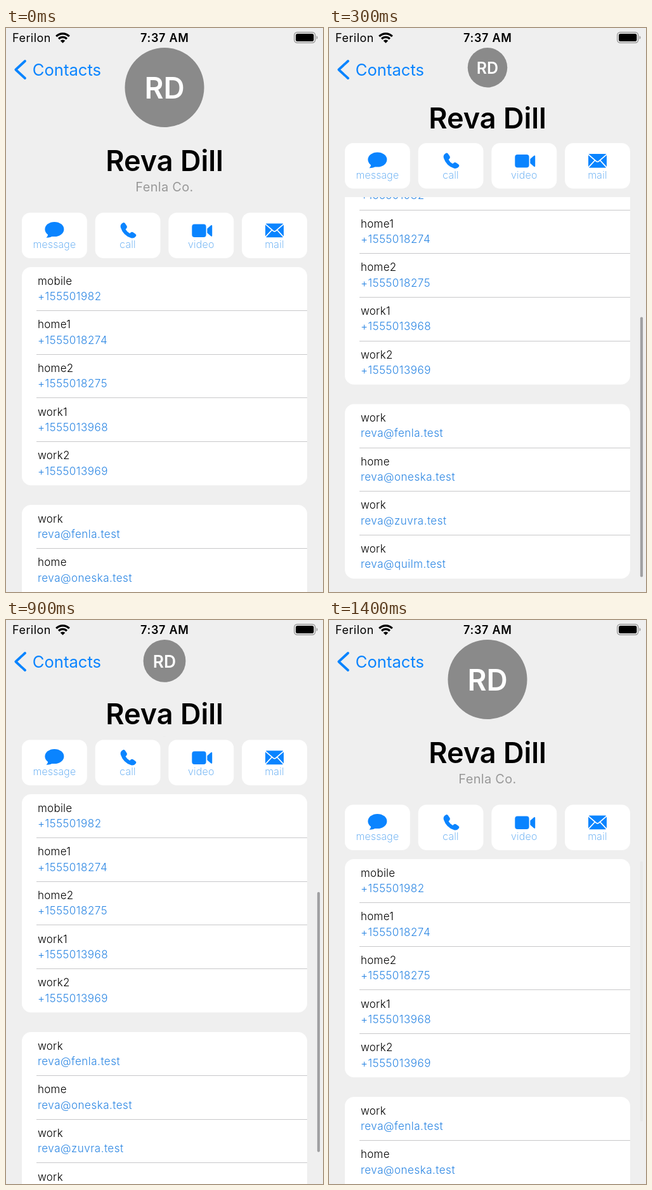
These frames come from a looping animation (500x887 px, 1500 ms). An HTML page:

```html
<!DOCTYPE html>
<html lang="en">
<head>
<meta charset="utf-8">
<title>Contact card</title>
<style>
  html, body { margin: 0; height: 100%; overflow: hidden; background: #efefef; }
  svg { display: block; width: 100vw; height: 100vh; font-family: Inter, "Open Sans", sans-serif; }
  .blue { fill: #0a84ff; }
  .mid { text-anchor: middle; }
  .bar { font-size: 18px; letter-spacing: .5px; }
  .time { font-weight: 600; letter-spacing: .7px; }
  .back { font-size: 25.6px; }
  .name { font-size: 45px; font-weight: 600; }
  .initials { font-weight: 600; fill: #fff; }
  .org { fill: #999; letter-spacing: .015em; }
  .tag { font-size: 16px; font-weight: 200; letter-spacing: .2px; fill: #4a9ff0; }
  .row { font-size: 17px; font-weight: 300; letter-spacing: .25px; }
  .value { fill: #2b86e3; letter-spacing: .5px; }
  .white { fill: #fff; }
  .rule { stroke: #c8c8ca; shape-rendering: crispEdges; }
</style>
</head>
<body>
<svg viewBox="0 0 500 887">
  <defs>
    <clipPath id="window"><rect id="clip" width="500" height="900"/></clipPath>
  </defs>
  <rect width="500" height="887" fill="#efefef"/>

  <g id="list" clip-path="url(#window)"><g id="content"></g></g>
  <rect id="thumb" x="490.9" width="4.2" height="409" rx="2.1" fill="#a0a0a2"/>

  <text class="bar" x="10" y="22">Ferilon</text>
  <g fill="none" stroke="#000" stroke-width="3.2">
    <path d="M79.2 13.2A14.6 14.6 0 0 1 99.8 13.2"/>
    <path d="M83.1 17.1A9 9 0 0 1 95.9 17.1"/>
  </g>
  <path d="M89.5 23.8L85.7 20A5.4 5.4 0 0 1 93.3 20Z"/>
  <text class="bar time mid" x="250.3" y="22">7:37 AM</text>
  <rect x="454.7" y="6.7" width="33" height="16.6" rx="4.8" fill="none" stroke="#9a9a9a" stroke-width="1.4"/>
  <rect x="457" y="9" width="28.4" height="12" rx="2.8"/>
  <path d="M489.6 12.2a3 3 0 0 1 0 5.6z" fill="#9a9a9a"/>

  <path d="M30 52L15.3 65.5L30 79" fill="none" stroke="#0a84ff" stroke-width="3.8" stroke-linecap="round" stroke-linejoin="round"/>
  <text class="back blue" x="41.8" y="74.5">Contacts</text>

  <circle id="avatar" cx="250" fill="#8a8a8a"/>
  <text id="initials" class="initials mid" x="250">RD</text>
  <text id="name" class="name mid" x="250">Reva Dill</text>
  <text id="org" class="org mid" x="250">Fenla Co.</text>
  <g id="buttons"></g>
</svg>
<script>
const $ = id => document.getElementById(id);
const set = (id, attrs) => {
  for (const k in attrs) $(id).setAttribute(k, attrs[k]);
};

// Icons are centred on x = 0, with y measured from the button's top edge.
const actions = [
  ['message', '<ellipse cy="26" rx="15" ry="11.6"/><path d="M-10 32Q-10 37-13 39.3Q-6 39.5-2 36Z"/>'],
  ['call', '<path d="M-8 16Q-6 14.7-4.3 16.8L-1.6 20.8Q-.4 22.7-2 24.4L-3.5 26Q-1.5 30 3 32.5L4.8 31Q6.4 29.6 8.2 30.8L12.2 33.5Q14.2 35 12.8 37Q9.8 41 5.2 39.8Q-7 36-11.2 23.5Q-12.6 18.8-8 16Z"/>'],
  ['video', '<rect x="-14.5" y="18" width="22.3" height="20.6" rx="4"/><path d="M9.5 25L15.6 19.7Q17.4 18.8 17.4 20.6V36.2Q17.4 38 15.6 37L9.5 31.7Z"/>'],
  ['mail', '<rect x="-14.5" y="17" width="29" height="21.8" rx="2"/><path d="M-14.5 17.8L-2 28.6Q0 30.2 2 28.6L14.5 17.8M-14.5 38.3L-4.4 27.5M14.5 38.3L4.4 27.5" fill="none" stroke="#fff" stroke-width="1.7"/>']
];
$('buttons').innerHTML = actions.map(([label, icon], i) =>
  `<g transform="translate(${76.4 + i * 115.7})">
    <rect class="white" x="-51.4" width="102.8" height="71.5" rx="13"/>
    <g class="blue">${icon}</g>
    <text class="tag mid" y="55.5">${label}</text>
  </g>`).join('');

const ROW = 68.65;
const card = (top, rows) => `<g transform="translate(0 ${top})">
  <rect class="white" x="25" width="450" height="${rows.length * ROW}" rx="14.5"/>` +
  rows.map(([label, value], i) => `<g transform="translate(0 ${i * ROW})">
    ${i ? '<path class="rule" d="M48 0H475"/>' : ''}
    <text class="row" x="50" y="27.6">${label}</text>
    <text class="row value" x="50" y="52">${value}</text>
  </g>`).join('') + '</g>';

$('content').innerHTML = card(0, [
  ['mobile', '+155501982'],
  ['home1', '+1555018274'],
  ['home2', '+1555018275'],
  ['work1', '+1555013968'],
  ['work2', '+1555013969']
]) + card(374, [
  ['work', 'reva@fenla.test'],
  ['home', 'reva@oneska.test'],
  ['work', 'reva@zuvra.test'],
  ['work', 'reva@quilm.test']
]);

const STEP = 100, STEPS = 15, FOLD = 109.5;
const titleStops = [[0, 0], [38, 21], [95, 56], [FOLD, 67]];

function titleLift(s) {
  const i = Math.max(1, titleStops.findIndex(([at]) => s <= at));
  const [a, u] = titleStops[i - 1], [b, v] = titleStops[i];
  return u + (v - u) * (s - a) / (b - a);
}

// A drag, a decaying flick up, then a flick back that bounces at the top.
function scrollAt(n) {
  if (n < 2) return n * 28;
  if (n < 8) return 198 - 103 * 0.383 ** (n - 2);
  return [170, 102, 38, 7, -1.5, -0.5, 0][n - 8];
}

function thumbAlpha(n) {
  if (n === 0) return 0;
  return n < 13 ? 1 : n === 13 ? 0.55 : 0.08;
}

function draw(n) {
  const scroll = scrollAt(n);
  const fold = Math.min(Math.max(scroll, 0), FOLD);
  const p = fold / FOLD;
  const r = 62.5 - 31.25 * p;
  const size = 46 - 21 * p;
  const base = 225 - titleLift(fold);

  set('avatar', { cy: 31 + r, r });
  set('initials', { y: 31.5 + r + size * 0.364, 'font-size': size });
  set('name', { y: base });
  set('org', { y: base + 32 - 13 * p, 'font-size': 20 * (1 - p), opacity: 1 - p });
  set('buttons', { transform: `translate(0 ${290.5 - fold})` });
  set('clip', { y: 375.5 - fold });
  set('content', { transform: `translate(0 ${376 - scroll})` });
  set('thumb', { y: 379.5 + 0.473 * scroll, opacity: thumbAlpha(n) });
}

const start = performance.now();
function tick() {
  draw(Math.floor((performance.now() - start) / STEP) % STEPS);
  requestAnimationFrame(tick);
}
tick();
</script>
</body>
</html>
```
